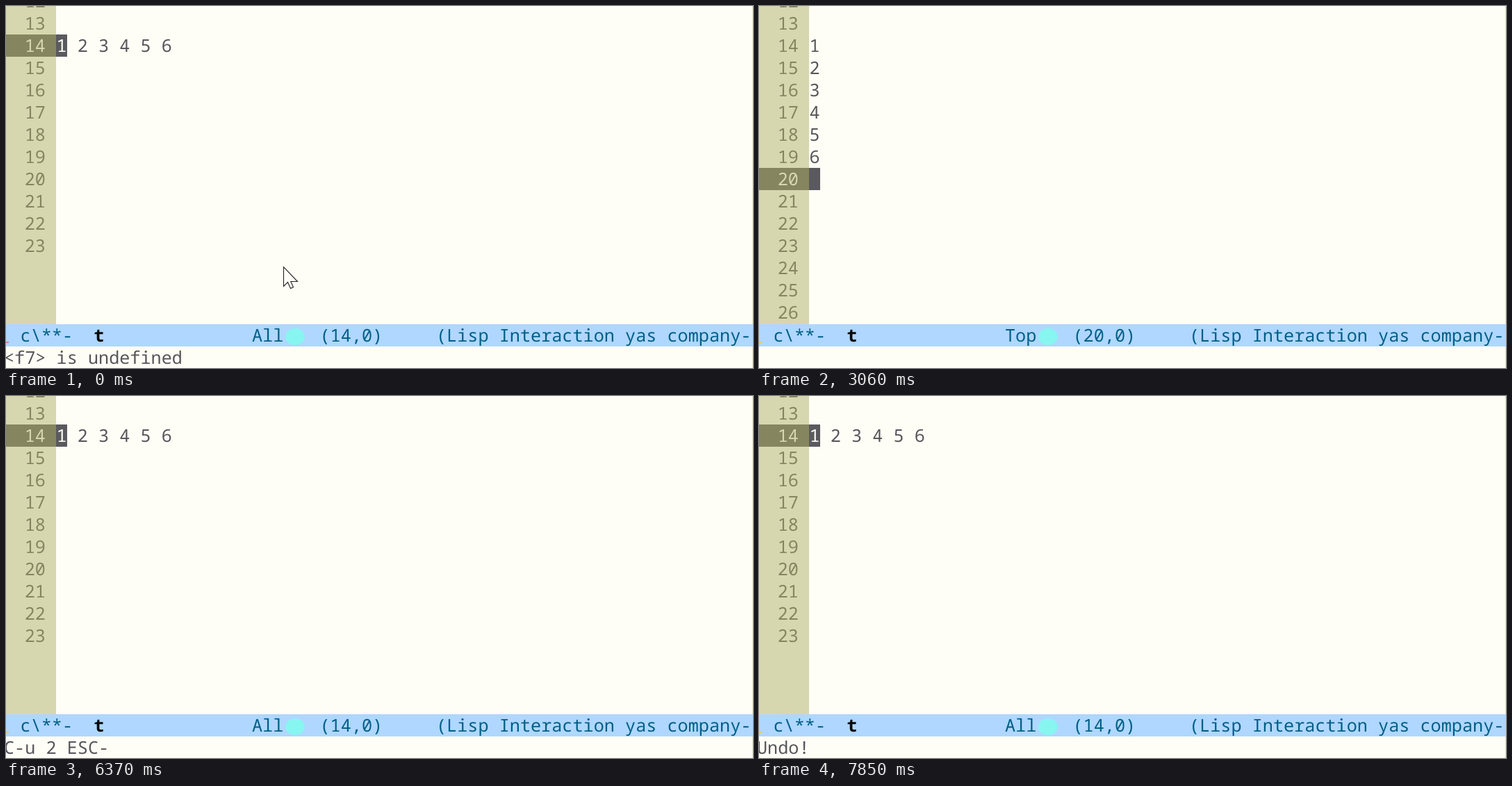
These frames come from a looping animation (1075 px wide and 521 px high, 8000 ms). An HTML page:

```html
<!DOCTYPE html>
<html lang="en">
<head>
<meta charset="utf-8">
<title>Editor session</title>
<style>
  html, body { margin: 0; width: 100%; height: 100%; overflow: hidden; background: #fefdf6; }
  svg { display: block; width: 1075px; height: 521px; }
  text {
    font: 25.2px "Noto Sans Mono", "DejaVu Sans Mono", monospace;
    text-rendering: geometricPrecision;
    white-space: pre;
    fill: #57575a;
  }
</style>
</head>
<body>
<svg id="stage" viewBox="0 0 1075 521"></svg>
<script>
const LOOP = 8000, ROW = 32, CELL = 15.12, LEFT = -3;
const PAPER = '#fefdf6', INK = '#57575a', GUTTER = '#d7d7af', OLIVE = '#85855f';
const PINK = '#e5788a', PEACH = '#efb39a', AMBER = '#ecc473';
const COMMANDS = ['lisp-interaction-mode', 'column-number-mode',
  'org-toggle-inline-images', 'yy-org-add-img-comment', 'yy-org-add-img'];

const numbers = ['1 2 3 4 5 6'];
const singles = ['1', '2', '3', '4', '5', '6'];
const pairs = ['1 2', '3 4', '5 6'];

const rect = (x, y, w, h, fill) =>
  `<rect x="${x}" y="${y}" width="${w}" height="${h}" fill="${fill}"/>`;
const text = (x, top, str, fill = INK, extra = '') =>
  `<text x="${x}" y="${top + 25}" fill="${fill}" style="fill:${fill};${extra}">${
    str.replace(/&/g, '&amp;').replace(/</g, '&lt;')}</text>`;
const lineTop = n => 41 + (n - 14) * ROW;

const pointer = `<path d="M399.5 375.5V403.5L405.5 397.5L409.5 406.5L413.5 404.8L409.8 396.5H419.5Z"
  fill="${PAPER}" stroke="#222" stroke-width="1.1"/>`;

function buffer({ lines, current = 14, last, height, gutter, hollow }) {
  const textX = gutter + 0.5;
  let out = rect(0, 0, gutter, height, GUTTER) +
    rect(0, lineTop(current), gutter, ROW, OLIVE);
  for (let n = 12; n <= last; n++) {
    out += text(gutter - 3 * CELL, lineTop(n), String(n), n === current ? GUTTER : OLIVE);
  }
  lines.forEach((line, i) => out += text(textX, lineTop(14 + i), line));

  const top = lineTop(current);
  if (hollow) {
    out += `<rect x="${textX}" y="${top + 0.5}" width="14" height="31" fill="none" stroke="${INK}"/>`;
  } else {
    const under = (lines[current - 14] || '').slice(0, 1);
    out += rect(gutter, top, 16, ROW, '#5a5a5e') + text(textX, top, under, PAPER);
  }
  return out;
}

function modeLine(top, position, line, mark) {
  const blue = '#005f87';
  return rect(0, top, 1075, ROW, '#afd7ff') +
    rect(0, top + 25, 4, 2, mark) +
    text(20.5, top, 'c\\**-', blue) +
    text(126.3, top, 't', '#080808', 'font-weight:700') +
    text(354, top, position, blue) +
    `<ellipse cx="416" cy="${top + 18}" rx="14" ry="12" fill="#87f5f0"/>` +
    text(451.5, top, `(${line},0)`, blue) +
    text(619, top, '(Lisp Interaction yas company-', blue);
}

const edge = rect(1074, 0, 1, 521, '#e2e2c6');

function editing({ echo = '', lines = numbers, current = 14, last = 23,
                   position = 'All', mark = AMBER, mouse = false }) {
  return edge + buffer({ lines, current, last, height: 458, gutter: 72 }) +
    modeLine(458, position, current, mark) +
    text(LEFT, 490, echo) + (mouse ? pointer : '');
}

function choosing({ prefix, mark = AMBER, mouse = false }) {
  return edge +
    buffer({ lines: numbers, last: 16, height: 138, gutter: 57, hollow: true }) +
    modeLine(138, 'Top', 14, mark) +
    rect(0, 170, 88, ROW, '#3a3a3a') + rect(88, 170, 15, ROW, '#606063') +
    text(LEFT, 170, prefix + ' M-x', '#5fafd7') +
    rect(0, 202, 72, ROW, '#d9fb5f') + text(LEFT, 202, 'yys-1') +
    COMMANDS.map((name, i) => text(LEFT, 234 + i * ROW, name)).join('') +
    (mouse ? pointer : '');
}

const first = echo => editing({ echo, mark: PINK, mouse: true });
const later = echo => editing({ echo });

const timeline = [
  [0, first('<f7> is undefined')],
  [1400, first('C-u-')],
  [1520, first('C-u 1-')],
  [1870, first('C-u 1 ESC-')],
  [2200, first('')],
  [2270, choosing({ prefix: '1', mark: PEACH, mouse: true })],
  [3060, editing({ lines: singles, current: 20, last: 26, position: 'Top' })],
  [4050, later('Undo!')],
  [4840, later('')],
  [4910, later('C-u-')],
  [5510, later('Quit')],
  [5970, later('C-u-')],
  [6100, later('C-u 2-')],
  [6370, later('C-u 2 ESC-')],
  [6770, later('')],
  [6900, choosing({ prefix: '2' })],
  [7300, editing({ lines: pairs, current: 17, last: 26 })],
  [7850, later('Undo!')],
];

const stage = document.getElementById('stage');
const start = performance.now();
let shown = null;

function draw() {
  const t = (performance.now() - start) % LOOP;
  const scene = timeline.filter(([at]) => at <= t).pop()[1];
  if (scene !== shown) stage.innerHTML = shown = scene;
  requestAnimationFrame(draw);
}
draw();
</script>
</body>
</html>
```
